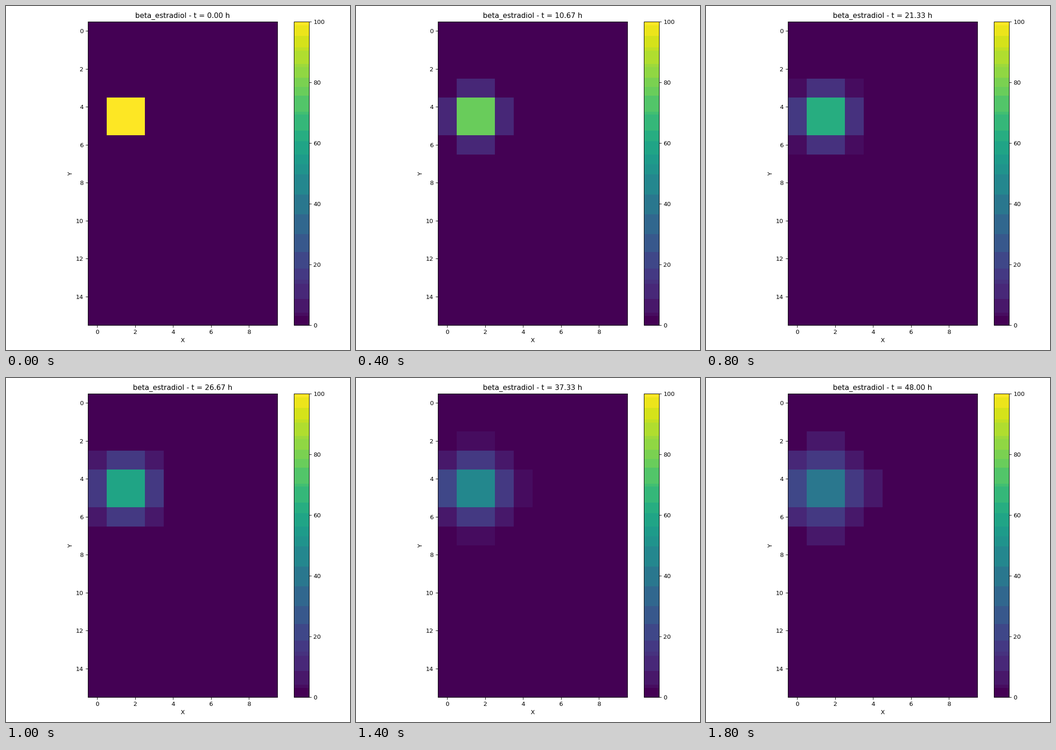
A matplotlib script that plays this animation: 748 px wide and 748 px high, repeating every 2000 ms.

```python
import matplotlib.pyplot as plt
import numpy as np
from matplotlib.animation import FuncAnimation
from matplotlib.colors import ListedColormap

SIZE = 748
INCHES = 8
ROWS, COLS = 16, 10
FRAMES = 10
HOURS = 48
RATE = 0.0125  # exchange between neighbouring cells per hour

# Upper limits of the inner colour bands, in percent.
LIMITS = [3, 4, 8.6, 13.6, 14.9, 18.6, 24, 30, 36.4, 43, 49.7, 53, 56.2,
          60.5, 64, 69.4, 70.3, 75.5, 78.5, 81.5, 85, 86, 90.5, 91.5, 95.3, 98.7]


def banded_viridis(steps=1000):
    edges = np.array([0, *LIMITS, 100]) / 100
    tones = (edges[:-1] + edges[1:]) / 2
    tones[0], tones[-1] = 0, 1
    values = (np.arange(steps) + 0.5) / steps
    bands = np.searchsorted(edges[1:-1], values)
    return ListedColormap(plt.get_cmap("viridis")(tones[bands]))


def spread(profile, hours):
    """Diffuse a 1D profile between closed ends."""
    n = len(profile)
    flow = np.diff(np.eye(n), axis=0)
    rates, modes = np.linalg.eigh(flow.T @ flow)
    return modes @ (np.exp(-RATE * hours * rates) * (modes.T @ profile))


def field(hours):
    column, row = np.zeros(ROWS), np.zeros(COLS)
    column[4:6] = 1
    row[1:3] = 1
    return 100 * np.outer(spread(column, hours), spread(row, hours))


def caption(hours):
    return f"beta_estradiol - t = {hours:.2f} h"


plt.rcParams["font.family"] = "DejaVu Sans"
fig, ax = plt.subplots(figsize=(INCHES, INCHES), dpi=SIZE / INCHES,
                       facecolor="white")
image = ax.imshow(field(0), cmap=banded_viridis(), vmin=0, vmax=100,
                  interpolation="nearest")
ax.set_xticks(range(0, COLS, 2))
ax.set_yticks(range(0, ROWS, 2))
ax.set_xlabel("X")
ax.set_ylabel("Y")
title = ax.set_title(caption(0))
fig.colorbar(image, ax=ax, ticks=range(0, 101, 20))
fig.tight_layout()


def update(i):
    hours = HOURS * i / (FRAMES - 1)
    image.set_data(field(hours))
    title.set_text(caption(hours))
    return image, title


anim = FuncAnimation(fig, update, frames=FRAMES, interval=200,
                     repeat=True, repeat_delay=0, blit=False)
plt.show()
```
